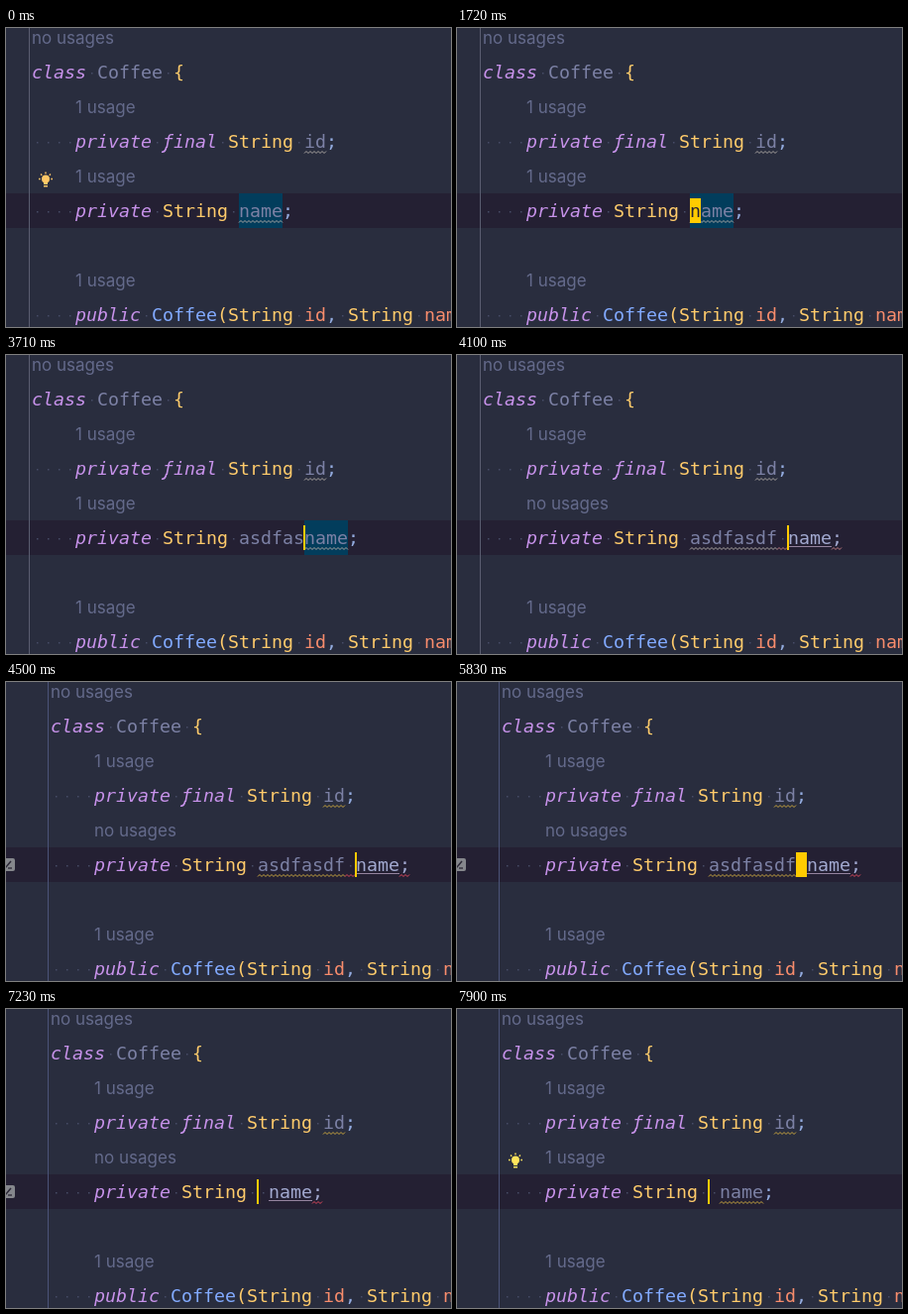
Recreate the animation shown at these times as an HTML page with a canvas. Size 449x302 px, loop 8000 ms.

```html
<!DOCTYPE html>
<html lang="en">
<head>
<meta charset="utf-8">
<title>Code editor</title>
<style>
  html, body { margin: 0; width: 100%; height: 100%; overflow: hidden; background: #292d3e; }
  canvas { display: block; width: 449px; height: 302px; }
</style>
</head>
<body>
<canvas id="stage" width="449" height="302"></canvas>
<script>
const ctx = document.getElementById('stage').getContext('2d');
const LOOP = 8000, CELL = 11, SCROLL_AT = 4500;
const MONO = '18.3px "DejaVu Sans Mono", monospace';
const HINT = '17px Inter, sans-serif';
const LINE_TOP = 167, LINE_H = 35, BASE = 191;
const C = {
  bg: '#292d3e', line: '#242033', mark: '#023d5c', caret: '#ffcb00',
  hint: '#646a8b', dot: '#474c67', key: '#c792ea', type: '#ffcb6b',
  dim: '#7c81a5', plain: '#a2a9d0', punct: '#93abdf', func: '#82aaff', param: '#f78c6c'
};

const WORD = 'asdfasdf ';
const KEY_TIMES = [3310, 3370, 3450, 3520, 3600, 3670, 3750, 3830, 3920];
const BULB_TIMES = [[0, 660], [1390, 1720], [2180, 2310], [2840, 3310], [6300, 6500], [7900, LOOP]];

function rect(x, y, w, h, color) {
  ctx.fillStyle = color;
  ctx.fillRect(x, y, w, h);
}

function stroke(color, width, points) {
  ctx.strokeStyle = color;
  ctx.lineWidth = width;
  ctx.beginPath();
  points.forEach(([x, y]) => ctx.lineTo(x, y));
  ctx.stroke();
}

function wave(x, base, cells, color) {
  const points = [];
  for (let d = 0; d <= cells * CELL; d += 2) points.push([x + d, base + (d % 4 ? 3.5 : 5.5)]);
  stroke(color, 1, points);
}

function hint(text, x, base) {
  ctx.font = HINT;
  ctx.fillStyle = C.hint;
  ctx.fillText(text, x, base);
}

// Draws text on the character grid and returns the next free x.
function write(text, x, base, color) {
  const italic = color === C.key;
  ctx.font = (italic ? 'italic ' : '') + MONO;
  for (const ch of text) {
    if (ch === ' ') {
      rect(x + 5, base - 6, 1.5, 1.5, C.dot);
    } else {
      ctx.fillStyle = color;
      ctx.fillText(ch, x, base);
      if (italic && ch === 'f') tail(x, base, color);
    }
    x += CELL;
  }
  return x;
}

function tail(x, base, color) {
  ctx.strokeStyle = color;
  ctx.lineWidth = 1.6;
  ctx.beginPath();
  ctx.moveTo(x + 3.8, base - 1);
  ctx.quadraticCurveTo(x + 2.8, base + 4.6, x - 1, base + 4.2);
  ctx.stroke();
}

function writeAll(tokens, x, base) {
  for (const [text, color] of tokens) x = write(text, x, base, color);
  return x;
}

function bulb(x, y, color) {
  ctx.fillStyle = color;
  ctx.beginPath();
  ctx.arc(x, y, 4, 0, Math.PI * 2);
  ctx.fill();
  rect(x - 2, y + 3, 4, 2.5, color);
  rect(x - 2, y + 6.5, 4, 1.5, color);
  for (let i = 0; i < 5; i++) {
    const a = Math.PI * (1 + i / 4), c = Math.cos(a), s = Math.sin(a);
    stroke(color, 1.4, [[x + c * 5.3, y + s * 5.3], [x + c * 7, y + s * 7]]);
  }
}

function gutterIcon() {
  ctx.fillStyle = '#85878c';
  ctx.beginPath();
  ctx.roundRect(-5, 178, 14, 13, 2);
  ctx.fill();
  stroke('#2a2735', 1.5, [[-1, 188], [5, 181]]);
  stroke('#2a2735', 1.3, [[2, 188], [6, 188]]);
}

// Caret: column, kind (bar, block, half) and whether it is shown.
function caretAt(t, typed) {
  if (t < 660) return null;
  if (t < 1650) return [4, 'block'];
  if (t < 2310) return [0, 'block'];
  if (t < 5300) return [typed, 'bar'];
  if (t < 5760) return null;
  if (t < 5830) return [9, 'bar'];
  if (t < 6760) return [8, 'block'];
  if (t < 7030) return [7, 'block'];
  if (t < 7230) return [7, 'half'];
  return [0, 'bar'];
}

function drawCaret(caret, text, x0) {
  if (!caret) return;
  const [col, kind] = caret, x = x0 + col * CELL;
  if (kind === 'bar') return rect(x - 1, 172, 2, 25, C.caret);
  const top = kind === 'half' ? 185 : 172;
  rect(x, top, CELL, 197 - top, C.caret);
  if (text[col] === ' ') return;
  ctx.save();
  ctx.beginPath();
  ctx.rect(x, top, CELL, 197 - top);
  ctx.clip();
  write(text[col], x, BASE, '#242033');
  ctx.restore();
}

function drawField(t, x, warn, error) {
  const removed = t >= 7230;
  const typed = removed ? 0 : KEY_TIMES.filter(k => t >= k).length;
  const prefix = removed ? ' ' : WORD.slice(0, typed);
  const broken = t >= 4000 && t < 7290;
  const nameX = x + prefix.length * CELL, endX = nameX + 4 * CELL;

  if (t < 4000) rect(nameX, LINE_TOP, 4 * CELL, LINE_H, C.mark);
  if (t >= 6760 && !removed) rect(x, LINE_TOP, 8 * CELL, LINE_H, C.mark);

  write(prefix, x, BASE, C.dim);
  write('name', nameX, BASE, broken ? C.plain : C.dim);
  write(';', endX, BASE, broken ? C.plain : C.punct);

  if (!broken) {
    wave(nameX, BASE, 4, warn);
  } else if (t >= 4100) {
    if (!removed) {
      wave(x, BASE, 8, warn);
      wave(x + 8 * CELL, BASE, 1, error);
    }
    stroke('#95849f', 1, [[nameX, BASE + 2.5], [endX, BASE + 2.5]]);
    wave(endX, BASE, 1, error);
  }
  drawCaret(caretAt(t, typed), prefix + 'name;', x);
}

function draw(t) {
  const scrolled = t >= SCROLL_AT;
  const left = scrolled ? 45 : 26, indent = left + 4 * CELL;
  const warn = scrolled ? '#c9a640' : '#aaa5a2';
  const error = scrolled ? '#e0485c' : '#c07c82';

  rect(0, 0, 449, 302, C.bg);
  rect(0, LINE_TOP, 449, LINE_H, C.line);
  rect(left - 3, 0, 1, 302, scrolled ? '#4b5378' : '#5a5d70');

  hint('no usages', left, 16);
  hint('1 usage', indent, 86);
  hint(t >= 4000 && t < 7430 ? 'no usages' : '1 usage', indent, 156);
  hint('1 usage', indent, 261);

  writeAll([['class', C.key], [' Coffee ', C.dim], ['{', C.type]], left, 51);

  const idX = writeAll([['    private final', C.key], [' String ', C.type]], left, 121);
  writeAll([['id', C.dim], [';', C.punct]], idX, 121);
  wave(idX, 121, 2, warn);

  const fieldX = writeAll([['    private', C.key], [' String ', C.type]], left, BASE);
  drawField(t, fieldX, warn, error);

  writeAll([
    ['    public', C.key], [' Coffee', C.func], ['(String ', C.type], ['id', C.param],
    [',', C.punct], [' String ', C.type], ['name', C.param]
  ], left, 296);

  if (BULB_TIMES.some(([from, to]) => t >= from && t < to)) {
    bulb(left + 14, 152.5, scrolled ? '#ffe45c' : '#ffc766');
  }
  if (scrolled && t < 7290) gutterIcon();
}

const start = performance.now();
function tick() {
  draw((performance.now() - start) % LOOP);
  requestAnimationFrame(tick);
}
tick();
</script>
</body>
</html>
```
